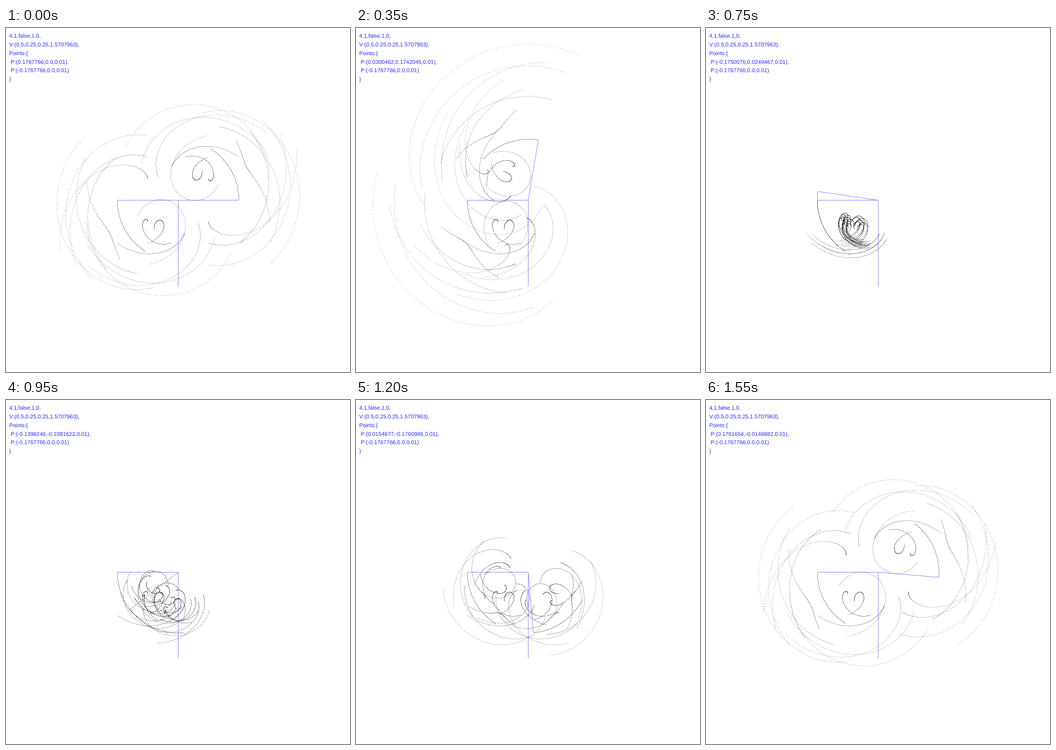
Recreate the animation shown at these times as an HTML page with a canvas. Size 748x748 px, loop 1600 ms.

```html
<!DOCTYPE html>
<html lang="en">
<head>
<meta charset="utf-8">
<style>
  html, body { margin: 0; width: 100%; height: 100%; overflow: hidden; background: #fff; }
  canvas { position: absolute; left: 0; top: 0; }
  pre {
    position: absolute; left: 6.9px; top: 8.4px; margin: 0;
    font: 12px/18.7px "Liberation Sans", Arial, sans-serif;
    font-kerning: none;
    text-rendering: geometricPrecision;
    color: #2a2aff;
  }
</style>
</head>
<body>
<canvas width="748" height="748"></canvas>
<pre></pre>
<script>
const SIZE = 748, STEP_MS = 50, STEPS = 32;
const DEPTH = 4, TRACE = 100, SPIN = 0.01, TURN = 0.2;
const LEN = 0.25, REACH = LEN / Math.SQRT2;
const ROOT = { x: 0.5, y: 0.5 };
const ctx = document.querySelector('canvas').getContext('2d');
const label = document.querySelector('pre');

const mul = (a, b) => ({ x: a.x * b.x - a.y * b.y, y: a.x * b.y + a.y * b.x });
const add = (a, b) => ({ x: a.x + b.x, y: a.y + b.y });
const polar = (r, a) => ({ x: r * Math.cos(a), y: r * Math.sin(a) });
const snap = v => Math.floor(v + 0.25);
const pixel = p => [snap(p.x * SIZE), snap((1 - p.y) * SIZE)];

function format(n) {
  const s = String(Math.trunc(n * 1e7) / 1e7);
  return s.includes('.') ? s : s + '.0';
}

function line(a, b) {
  const [x1, y1] = pixel(a), [x2, y2] = pixel(b);
  ctx.beginPath();
  ctx.moveTo(x1 + 0.5, y1 + 0.5);
  ctx.lineTo(x2 + 0.5, y2 + 0.5);
  ctx.stroke();
}

// Every branch is its parent turned and shrunk by one of the ratios.
function grow(tip, dir, ratios, depth) {
  for (const ratio of ratios) {
    const d = mul(dir, ratio), p = add(tip, d);
    ctx.fillRect(...pixel(p), 1, 1);
    if (depth > 1) grow(p, d, ratios, depth - 1);
  }
}

function draw(step) {
  const stem = { x: 0, y: LEN };
  const points = [polar(REACH, TURN * step), { x: -REACH, y: 0 }];
  const ratios = points.map(p => mul(p, { x: 0, y: -1 / LEN }));

  ctx.clearRect(0, 0, SIZE, SIZE);
  ctx.strokeStyle = '#7f7fff';
  line({ x: ROOT.x, y: ROOT.y - LEN }, ROOT);
  points.forEach(p => line(ROOT, add(ROOT, p)));

  ctx.fillStyle = 'rgba(0, 0, 0, 0.6)';
  for (let i = 1; i <= TRACE; i++) {
    const spin = polar(1, i * SPIN);
    grow(ROOT, stem, ratios.map(r => mul(r, spin)), DEPTH);
  }

  label.textContent = '4,1,false,1,0,\nV:(0.5,0.25,0.25,1.5707963),\nPoints:{\n' +
    points.map(p => ` P:(${format(p.x)},${format(p.y)},${SPIN})`).join(',\n') + '\n}';
}

let shown = -1;
function tick() {
  const step = Math.floor(performance.now() / STEP_MS) % STEPS;
  if (step !== shown) draw(shown = step);
  requestAnimationFrame(tick);
}
tick();
</script>
</body>
</html>
```
